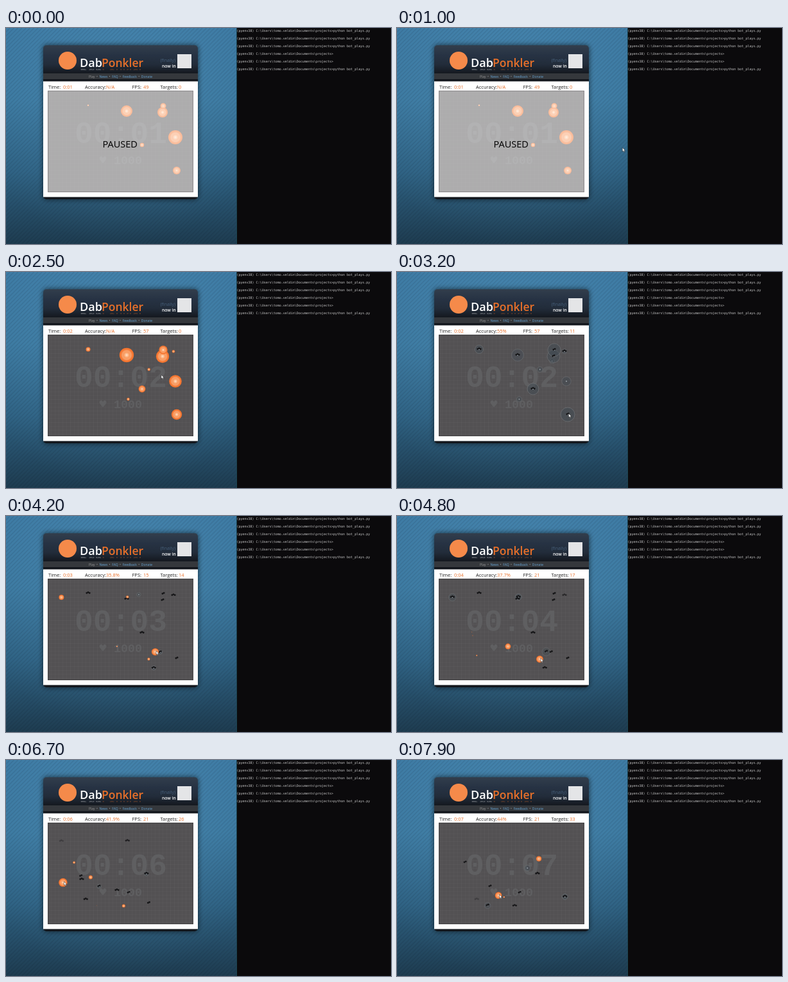
An HTML page with a canvas for the animation above (8000 ms loop, 600x338 px).

```html
<!DOCTYPE html>
<html lang="en">
<head>
<meta charset="utf-8">
<title>Aim trainer bot</title>
<style>
  html, body { margin: 0; width: 100%; height: 100%; overflow: hidden; background: #0b0a0c; }
  canvas { display: block; }
</style>
</head>
<body>
<canvas id="stage" width="600" height="338"></canvas>
<script>
const ctx = document.getElementById('stage').getContext('2d');
const LOOP = 8000, STEP = 100;
const RESUME = 2100, BURST = 2770, STEADY = 3738;   // ms
const BURST_GAP = 42, STEADY_GAP = 198;             // ms between hits
const GROWTH = 0.0055, PEAK = 11.5;                 // px per ms, px
const RING_LIFE = 500, HOLE_LIFE = 2400;
const FIELD = { x: 65, y: 98, w: 227, h: 159 };
const SANS = '"Open Sans", sans-serif';
const MONO = '"Liberation Mono", monospace';
const DEJAVU = '"DejaVu Sans Mono", monospace';
const ORANGE = '#e8702a';

const mix = (a, b, k) => a + (b - a) * k;
const clamp01 = k => Math.min(1, Math.max(0, k));

function random(seed) {
  const v = Math.sin(seed * 12.9898) * 43758.5453;
  return v - Math.floor(v);
}

// Targets are listed in the order in which the bot shoots them
const targets = [];

function addTarget(x, y, born, hit, gap) {
  const misses = Math.floor(random(targets.length + 0.3) * 3);
  targets.push({ x, y, born, hit, aim: hit - gap, misses });
}

function addRandomTarget(hit, gap) {
  const seed = 10 * targets.length;
  const x = FIELD.x + FIELD.w * mix(0.08, 0.93, random(seed + 1));
  const y = FIELD.y + FIELD.h * mix(0.12, 0.9, random(seed + 2));
  const life = mix(550, 1250, random(seed + 3));
  addTarget(x, y, Math.max(RESUME, hit - life), hit, gap);
}

const burstHit = () => BURST + BURST_GAP * targets.length;
for (let i = 0; i < 4; i++) addRandomTarget(burstHit(), BURST_GAP);

// x, y and radius of the targets on the paused screen
[[188, 130, 9], [264, 171, 11], [244, 132, 8], [128, 121, 1.3], [245, 122, 4.5], [212, 183, 3.2], [266, 223, 6]]
  .forEach(([x, y, r]) => addTarget(x, y, RESUME - r / GROWTH, burstHit(), BURST_GAP));

for (let hit = STEADY; hit < LOOP + 1250; hit += STEADY_GAP) addRandomTarget(hit, STEADY_GAP);

function rect(x, y, w, h, fill) {
  ctx.fillStyle = fill;
  ctx.fillRect(x, y, w, h);
}

function text(str, x, y, size, color, family = SANS, weight = 400) {
  ctx.font = `${weight} ${size}px ${family}`;
  ctx.fillStyle = color;
  ctx.fillText(str, x, y);
}

function circle(x, y, r, fill) {
  ctx.beginPath();
  ctx.arc(x, y, r, 0, Math.PI * 2);
  ctx.fillStyle = fill;
  ctx.fill();
}

function addStops(gradient, colors) {
  colors.forEach((c, i) => gradient.addColorStop(i / (colors.length - 1), c));
  return gradient;
}

const vertical = (y0, y1, ...colors) => addStops(ctx.createLinearGradient(0, y0, 0, y1), colors);
const radial = (x, y, r, ...colors) => addStops(ctx.createRadialGradient(x, y, 0, x, y, r), colors);

function drawDesktop() {
  rect(0, 0, 360, 338, vertical(0, 338, '#3d7aa3', '#3b789f', '#2e6182', '#1e3c50'));
  rect(0, 0, 360, 338, radial(179, 110, 230, 'rgba(110,180,220,.22)', 'rgba(110,180,220,0)'));
  ctx.strokeStyle = 'rgba(0,15,30,.09)';
  ctx.lineWidth = 1.4;
  ctx.beginPath();
  for (let x = 0; x < 700; x += 6.25) {
    ctx.moveTo(x, 0);
    ctx.lineTo(x - 338, 338);
  }
  ctx.stroke();
}

function drawTerminal() {
  rect(359, 0, 1, 338, '#1d4653');
  rect(360, 0, 240, 338, '#0b0a0c');
  const prompt = '(pyenv38) C:\\Users\\tomo.veldin\\Documents\\projects>';
  for (let i = 0; i < 6; i++) {
    const command = i === 3 || i === 4 ? '' : 'python bot_plays.py';
    text(prompt + command, 359.5, 6 + 12 * i, 5, '#ccc', DEJAVU);
  }
}

function drawTitle() {
  text('Dab', 115, 61, 18, '#fff', SANS, 600);
  text('Ponkler', 149, 61, 17.5, ORANGE, SANS, 600);
}

function drawPanel() {
  ctx.save();
  ctx.shadowColor = 'rgba(0,0,0,.65)';
  ctx.shadowBlur = 8;
  ctx.beginPath();
  ctx.roundRect(58, 27, 241, 241, 5);
  ctx.fillStyle = vertical(27, 72, '#323e4c', '#273344', '#222c3a', '#13171d');
  ctx.fill();
  ctx.restore();

  circle(96, 51, 14, '#f58a4a');
  drawTitle();
  ctx.save();
  ctx.beginPath();
  ctx.rect(110, 62.5, 110, 3.5);
  ctx.clip();
  ctx.globalAlpha = 0.25;
  ctx.translate(0, 124.5);
  ctx.scale(1, -1);
  drawTitle();
  ctx.restore();

  text('(finally)', 240.5, 53, 7, '#46607a');
  text('now in', 243, 61.5, 6.8, '#fff', SANS, 600);
  rect(267, 41, 22, 22, '#e4e5e7');

  rect(58, 71, 241, 9, '#35383c');
  let x = 129;
  ['Play', 'News', 'FAQ', 'Feedback', 'Donate'].forEach((label, i) => {
    if (i) text('•', x - 4.7, 77.6, 5, '#aaa');
    text(label, x, 77.6, 5, i ? '#68a5d4' : '#999');
    x += ctx.measureText(label).width + 7;
  });
  rect(58, 83.5, 241, 181, '#fff');
}

function drawStats(t, seconds) {
  const hits = targets.filter(g => g.hit <= t).length;
  const shots = Math.round(t < STEADY ? hits * 1.8 : 39 + 1.9 * (hits - 14));
  const accuracy = hits ? Math.floor(hits / shots * 1000) / 10 + '%' : 'N/A';
  const fps = t < RESUME ? 49 : t < 3600 ? 57 : t < 4700 ? 15 : 21;
  const stat = (label, x, value, valueX) => {
    text(label, x, 94.5, 7.5, '#222');
    text(value, valueX, 94.5, 7.5, ORANGE);
  };
  stat('Time:', 66, '0:0' + seconds, 89);
  stat('Accuracy:', 123, accuracy, 156);
  stat('FPS:', 196.5, fps, 214);
  stat('Targets:', 240.5, hits, 269);
}

function drawField(seconds) {
  const { x, y, w, h } = FIELD;
  rect(x, y, w, h, '#535153');
  ctx.strokeStyle = 'rgba(255,255,255,.025)';
  ctx.lineWidth = 1;
  ctx.beginPath();
  for (let gx = x + 5.5; gx < x + w; gx += 6) {
    ctx.moveTo(gx, y);
    ctx.lineTo(gx, y + h);
  }
  for (let gy = y + 5.5; gy < y + h; gy += 6) {
    ctx.moveTo(x, gy);
    ctx.lineTo(x + w, gy);
  }
  ctx.stroke();
  const faint = '#5f5f61';
  text('00:0' + seconds, 107, 179.5, 48, faint, MONO, 700);
  text('♥', 145.5, 213, 18.3, faint, DEJAVU);
  text('1000', 168, 212.5, 18.3, faint, MONO, 700);
}

function radiusAt(target, t) {
  const grown = GROWTH * (t - target.born);
  return Math.max(0, PEAK - Math.abs(PEAK - grown));
}

function drawHoles(x, y, count, age) {
  if (age < 0 || age > HOLE_LIFE) return;
  ctx.globalAlpha = clamp01((HOLE_LIFE - age) / 400);
  for (let i = 0; i <= count; i++) {
    circle(x + (i - count / 2) * 2.2, y - 0.5 - (i % 2), 1.4, '#161618');
  }
  ctx.globalAlpha = 1;
}

function drawRing(target, age) {
  if (age < 0 || age > RING_LIFE) return;
  ctx.globalAlpha = mix(1, 0.6, age / RING_LIFE);
  circle(target.x, target.y, radiusAt(target, target.hit), 'rgba(64,74,82,.55)');
  ctx.strokeStyle = '#737679';
  ctx.lineWidth = 0.7;
  ctx.stroke();
  circle(target.x, target.y, 0.9, '#b5c0c8');
  ctx.globalAlpha = 1;
}

function drawTarget({ x, y }, r) {
  circle(x, y, r, radial(x, y, r, '#ffe2cc', '#fdbd90', '#f99b60', '#f9a06a', '#f57a35', '#f4702a'));
}

function drawTargets(t, clock) {
  targets.forEach(g => drawRing(g, t - g.hit));
  targets.forEach(g => g.misses && drawHoles(g.x, g.y, g.misses, t - g.hit + 100));
  targets.forEach(g => {
    const r = radiusAt(g, clock);
    if (t < g.hit && clock > g.born && r > 0) drawTarget(g, r);
  });
}

function drawPause() {
  rect(FIELD.x, FIELD.y, FIELD.w, FIELD.h, 'rgba(255,255,255,.52)');
  text('PAUSED', 150.5, 187, 14.5, '#000');
}

function drawBorder(color) {
  ctx.strokeStyle = color;
  ctx.lineWidth = 1;
  ctx.strokeRect(FIELD.x + 0.5, FIELD.y + 0.5, FIELD.w - 1, FIELD.h - 1);
}

function drawCursor(t) {
  if (t < 400) return;
  const aimed = targets.filter(g => g.aim <= t).pop();
  const travel = clamp01((t - 400) / 900);
  const x = aimed ? aimed.x + 1.5 : mix(570, 242, travel);
  const y = aimed ? aimed.y - 1.5 : mix(240, 161, travel);
  ctx.save();
  ctx.translate(x, y);
  ctx.beginPath();
  [[0, 0], [0, 6], [1.4, 4.8], [2.4, 7], [3.4, 6.6], [2.5, 4.4], [4.2, 4.2]].forEach(p => ctx.lineTo(...p));
  ctx.closePath();
  ctx.fillStyle = '#fff';
  ctx.fill();
  ctx.strokeStyle = '#222';
  ctx.lineWidth = 0.5;
  ctx.stroke();
  ctx.restore();
}

function draw(t) {
  const paused = t < RESUME;
  const clock = Math.max(t, RESUME);
  const seconds = Math.floor((clock - 350) / 1000);
  drawDesktop();
  drawTerminal();
  drawPanel();
  drawStats(t, seconds);
  drawField(seconds);
  drawTargets(t, clock);
  if (paused) drawPause();
  drawBorder(paused ? '#8a888a' : '#454446');
  drawCursor(t);
}

const start = performance.now();
function tick() {
  const t = (performance.now() - start) % LOOP;
  draw(Math.floor(t / STEP) * STEP);
  requestAnimationFrame(tick);
}
tick();
</script>
</body>
</html>
```
